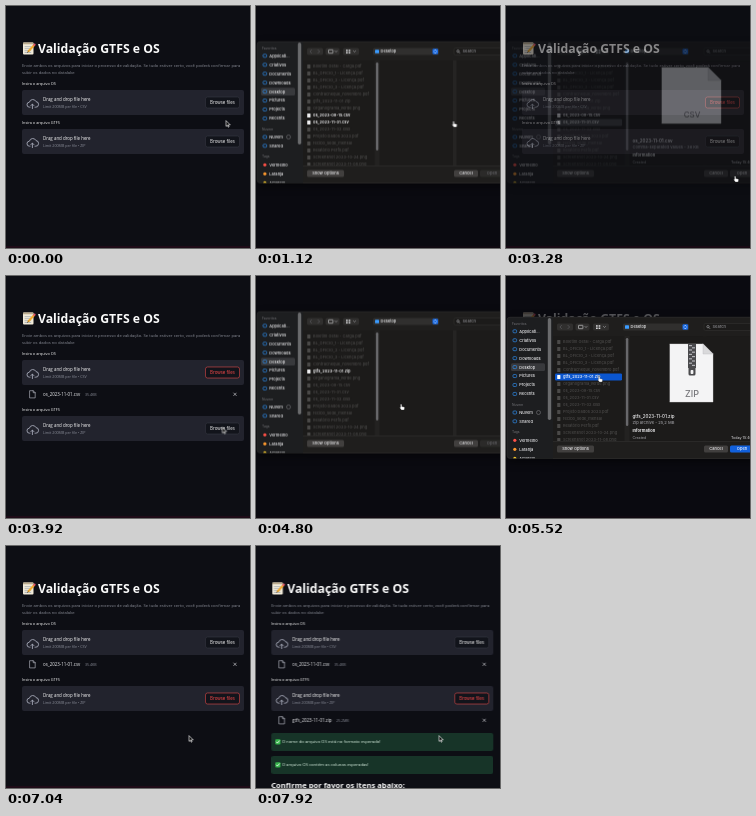
An HTML page for the animation above (8 s loop, 244 by 242 pixels).

```html
<!DOCTYPE html>
<html lang="pt">
<head>
<meta charset="utf-8">
<title>Validação GTFS e OS</title>
<style>
html, body { margin: 0; width: 100%; height: 100%; overflow: hidden; background: #0d0e14; }
svg { display: block; width: 100vw; height: 100vh; }
text { font-family: "Open Sans", "Noto Sans", sans-serif; white-space: pre; }
#dialog { filter: drop-shadow(0 3px 4px rgba(0, 0, 0, .5)); }
#dialog text { font-family: Inter, "Liberation Sans", sans-serif; font-weight: 500; }
</style>
</head>
<body>
<svg id="stage" viewBox="0 0 244 242" preserveAspectRatio="none"></svg>
<script>
const LOOP = 8000;

const rect = (x, y, w, h, fill, r = 0, more = '') =>
  `<rect x="${x}" y="${y}" width="${w}" height="${h}" rx="${r}" fill="${fill}" ${more}/>`;
const path = (d, stroke, width = 0.6, fill = 'none') =>
  `<path d="${d}" stroke="${stroke}" stroke-width="${width}" fill="${fill}" stroke-linejoin="round" stroke-linecap="round"/>`;
// y is the middle of the capitals
const text = (x, y, size, str, fill, more = '') =>
  `<text x="${x}" y="${y + size * 0.35}" font-size="${size}" fill="${fill}" ${more}>${str}</text>`;
const group = (id, body, hidden = false) =>
  `<g id="${id}"${hidden ? ' opacity="0"' : ''}>${body}</g>`;
const MID = 'text-anchor="middle"';
const BOLD = 'font-weight="700"';

// ---------- page ----------
const button = (stroke, color) =>
  rect(199.5, 7, 34, 11, '#12141b', 2, `stroke="${stroke}" stroke-width=".6"`) +
  text(216.5, 12.6, 4.45, 'Browse files', color, MID);

const cross = (x, y) => path(`M${x - 1.3} ${y - 1.3}l2.6 2.6m0 -2.6l-2.6 2.6`, '#e4e5ea', 0.6);

const fileRow = (name, size, sizeX) =>
  path('M24 30.7h3.2l2 2v5.2h-5.2zM27.2 30.7v2h2', '#c3c6d0', 0.6) +
  text(37, 34.3, 4.4, name, '#f2f3f6') +
  text(sizeX, 34.3, 3.6, size, '#8b8e99') +
  cross(229, 34.3);

function uploader(n, label, type, row) {
  return text(16, -6, 3.85, label, '#fafafa') +
    rect(16, 0, 222, 25, '#22232d', 2) +
    path('M24 17.2h-.4a2.5 2.5 0 0 1 -.2 -5a3.5 3.5 0 0 1 6.6 -.6a2.8 2.8 0 0 1 -.5 5.6h-.5M26.4 18.6v-4.4m-1.5 1.4l1.5 -1.5l1.5 1.5', '#a6aab8', 0.9) +
    text(37, 9, 4.42, 'Drag and drop file here', '#fafafa') +
    text(37, 17, 3.65, `Limit 200MB per file • ${type}`, '#8b8e99') +
    button('#343741', '#fafafa') +
    group('hot' + n, button('#d94343', '#ff4b4b'), true) +
    group('row' + n, row, true);
}

const memo =
  rect(17, 36.5, 10.5, 12, '#f1ead9', 1) +
  rect(17, 36.5, 10.5, 1.8, '#b9a98c', 0.6) +
  [40.5, 42.5, 44.5, 46.4].map(y => rect(18.6, y, 6.6, 0.6, '#8d9aa6')).join('') +
  path('M22.5 45.2L28.2 39', '#f0a92e', 2) +
  path('M28.1 39.1l.5 -.6', '#e0566d', 2) +
  path('M21.6 46.2l.5 -.5', '#4a3b30', 1);

const success = (y, str) =>
  rect(16, y, 222, 18, '#173428', 2) +
  rect(20, y + 6.3, 5.2, 5.2, '#35b44a', 1) +
  path(`M21.2 ${y + 9}l1 1.1l1.9 -2.4`, '#fff', 0.8) +
  text(26.7, y + 9, 4.25, str, '#dcf3e4');

const GRAY = '#878a94';
const page =
  memo +
  text(32, 42.7, 12.25, 'Validação GTFS e OS', '#fafafa', BOLD) +
  text(16, 59.7, 4.22, 'Envie ambos os arquivos para iniciar o processo de validação. Se tudo estiver certo, você poderá confirmar para', GRAY) +
  text(16, 67, 4.22, 'subir os dados no datalake', GRAY) +
  `<g transform="translate(0 84)">${uploader(1, 'Insira o arquivo OS', 'CSV', fileRow('os_2023-11-01.csv', '35.4KB', 79))}</g>` +
  group('second', uploader(2, 'Insira o arquivo GTFS', 'ZIP', fileRow('gtfs_2023-11-01.zip', '25.2MB', 81))) +
  group('ok1', success(187, 'O nome do arquivo OS está no formato esperado!'), true) +
  group('ok2', success(210, 'O arquivo OS contém as colunas esperadas!') +
    text(16, 239.6, 7.65, 'Confirme por favor os itens abaixo:', '#fafafa', BOLD), true);

// ---------- file dialog, top edge at y = 0 ----------
const BODY = '#1c1b1a', FIELD = '#302f2e', PUSH = '#413f3e', EDGE = '#353433';
const FILES = [
  'Boletim Geral - Carga.pdf', 'BL_OFICIO_1 - Licença.pdf', 'BL_OFICIO_2 - Licença.pdf',
  'BL_OFICIO_3 - Licença.pdf', 'Contracheque_novembro.pdf', 'gtfs_2023-11-01.zip',
  'Organograma_verde.png', 'os_2023-09-15.csv', 'os_2023-11-01.csv', 'os_2023-11-02.xlsx',
  'Projeto Dados 2023.pdf', 'recibo_sede_mensal', 'Relatório Perfil.pdf',
  'Screenshot 2023-10-24.png', 'Screenshot 2023-11-08.png'
];
const fileY = i => 25 + 7 * i;
const fileItem = (i, color) =>
  rect(51.2, fileY(i) - 2, 3.2, 4, color, 0.5) +
  text(57, fileY(i), 4, FILES[i], color);
const picked = (i, fill) =>
  rect(49, fileY(i) - 3.6, 67, 7.1, fill, 1.2) + fileItem(i, '#ffffff');

const side = (y, str, icon) => icon + text(13.3, y, 4, str, '#ececee');
const PLACES = ['Applicati…', 'Criativos', 'Documents', 'Downloads', 'Desktop', 'Pictures', 'Projects', 'Recents'];
const TAGS = [['Vermelho', '#ff5147'], ['Laranja', '#ff9a2e'], ['Amarelo', '#ffd02e']];
const blueIcon = y => rect(7, y - 1.5, 3.6, 3, 'none', 0.9, 'stroke="#2f8ff0" stroke-width=".7"');
const head = (y, str) => text(6, y, 3.3, str, '#68686c');

const sidebar =
  rect(0, 0, 47, 142, '#1d1e20') +
  rect(5, 46.3, 34, 7.6, '#38393c', 1.5) +
  head(7, 'Favoritos') +
  PLACES.map((p, i) => side(14.3 + 8.95 * i, p, blueIcon(14.3 + 8.95 * i))).join('') +
  head(87.5, 'Nuvem') +
  side(95.5, 'Nuvem', blueIcon(95.5)) +
  '<circle cx="32.5" cy="95.5" r="2" fill="none" stroke="#77777b" stroke-width=".6"/>' +
  side(104.3, 'Shared', blueIcon(104.3)) +
  head(115, 'Tags') +
  TAGS.map(([name, color], i) =>
    side(123.3 + 9 * i, name, `<circle cx="8.8" cy="${123.3 + 9 * i}" r="1.6" fill="${color}"/>`)).join('') +
  rect(41.8, 1, 3.4, 102, '#6a6b6d', 1.7);

const toolbar =
  rect(47, 0, 200, 19, '#1f1e1d') +
  rect(51, 6.5, 16, 7, FIELD, 1.5) +
  path('M55.5 8.4l-1.6 1.6l1.6 1.6M62 8.4l1.6 1.6l-1.6 1.6', '#66666a', 0.6) +
  rect(69.5, 6.5, 14, 7, FIELD, 1.5) + rect(72.5, 8.3, 4.4, 3.4, 'none', 0.4, 'stroke="#d8d8da" stroke-width=".6"') +
  rect(87, 6.5, 16, 7, FIELD, 1.5) +
  [90, 92.6].map(x => rect(x, 8.2, 1.7, 1.5, '#d8d8da') + rect(x, 10.5, 1.7, 1.5, '#d8d8da')).join('') +
  path('M79 9.5l1 1l1 -1M97.5 9.5l1 1l1 -1', '#b8b8ba', 0.6) +
  rect(117, 6.5, 66, 7, FIELD, 1.5) +
  rect(119, 8.2, 4, 3.6, '#3b9cff', 0.6) +
  text(124.5, 10, 4, 'Desktop', '#e8e8ea') +
  rect(176.5, 7.2, 5.6, 5.6, '#1667e0', 1.2) +
  path('M178.2 9.3l1.1 -1.1l1.1 1.1M178.2 10.8l1.1 1.1l1.1 -1.1', '#fff', 0.6) +
  rect(198, 6.5, 52, 7, BODY, 1.5, `stroke="${EDGE}" stroke-width=".5"`) +
  '<circle cx="202" cy="9.7" r="1.2" fill="none" stroke="#a5a5a8" stroke-width=".6"/>' +
  path('M203 10.7l.9 .9', '#a5a5a8') +
  text(206.5, 10, 4, 'Search', '#8c8c90');

const push = (x, w, str, fill, color) =>
  rect(x, 128.5, w, 7, fill, 1.5) + text(x + w / 2, 132, 4, str, color, MID);
const footer =
  rect(47, 124, 200, 18, '#1f1e1d') +
  rect(47, 124, 200, 0.5, EDGE) +
  push(51, 37, 'Show Options', PUSH, '#ececee') +
  push(198, 24, 'Cancel', PUSH, '#ececee') +
  push(224, 24, 'Open', '#2b2a29', '#66666a');

const sheet = (x, y, w, h, fold) =>
  path(`M${x} ${y}h${w - fold}l${fold} ${fold}v${h - fold}h${-w}z`, '#d4d4d6', 0.4, '#f4f4f5') +
  path(`M${x + w - fold} ${y}v${fold}h${fold}z`, '#b9b9bc', 0.4, '#d9d9db');
const preview = (art, name, kind) =>
  rect(124, 19.2, 122, 104.6, BODY) + art +
  text(126.5, 99, 4.5, name, '#f0f0f2') +
  text(126.5, 105.8, 4.1, kind, '#98989c') +
  text(126.5, 113.6, 4, 'Information', '#f0f0f2', 'style="font-weight:700"') +
  text(126.5, 120.6, 3.6, 'Created', '#8c8c90') +
  text(225, 120.6, 3.6, 'Today 15:40', '#c8c8cb');

const zipper = rect(182, 27, 8, 24, '#4a4a4d') +
  Array.from({ length: 10 }, (_, i) =>
    rect(i % 2 ? 186 : 183, 28 + 2.2 * i, 3, 1.2, '#b4b4b8')).join('') +
  rect(182.5, 49, 7, 9.5, '#4a4a4d', 1.5) + rect(184.6, 53, 2.8, 4, '#f4f4f5', 0.8);
const csvArt = sheet(156, 26, 59, 56, 13) + text(186, 73, 8, 'CSV', '#77777b', MID);
const zipArt = sheet(164, 27, 43, 58, 10) + zipper + text(186, 76.5, 9, 'ZIP', '#77777b', MID);

const dialog =
  '<clipPath id="frame"><rect x="1" y="0" width="260" height="141.5" rx="3"/></clipPath><g clip-path="url(#frame)">' +
  rect(0, 0, 260, 142, BODY) + sidebar + toolbar +
  FILES.map((_, i) => fileItem(i, '#4a4948')).join('') +
  group('csvs', fileItem(7, '#f0f0f2') + fileItem(8, '#f0f0f2')) +
  group('zips', fileItem(5, '#f0f0f2'), true) +
  rect(118.5, 19, 5, 105, '#232221') +
  rect(119.9, 21, 2.4, 88, '#68686b', 1.2) +
  rect(197, 19, 3.5, 105, '#252423') +
  footer +
  group('csvPick', preview(csvArt, 'os_2023-11-01.csv', 'Comma-separated values - 36 KB'), true) +
  group('zipPick', preview(zipArt, 'gtfs_2023-11-01.zip', 'Zip archive - 25,2 MB'), true) +
  group('csvGray', picked(8, '#47484b'), true) +
  group('csvBlue', picked(8, '#0b56cf'), true) +
  group('zipGray', picked(5, '#47484b'), true) +
  group('zipBlue', picked(5, '#0b56cf'), true) +
  group('openGray', push(224, 24, 'Open', PUSH, '#ececee'), true) +
  group('openBlue', push(224, 24, 'Open', '#1160dc', '#ffffff'), true) +
  '</g>' +
  rect(1, 0.2, 260, 141.2, 'none', 3, `stroke="${EDGE}" stroke-width=".5"`);

const arrow = path('M0 0v5.4l1.3 -1.2l.9 2l.9 -.4l-.9 -1.9h1.7z', '#fff', 0.6, '#111');
const hand = path('M1 0q.8 0 .8 .8v1.7l2.2 .5q.7 .2 .6 1l-.5 2h-2.7l-1.7 -2.3q.1 -.8 .8 -.3v-2.6q0 -.8 .5 -.8z', '#222', 0.3, '#fff');

const $ = id => document.getElementById(id);
$('stage').innerHTML =
  rect(0, 0, 244, 242, '#0d0e14') +
  group('line', rect(0, 240, 244, 2, '#1e0b17')) +
  group('page', page) +
  group('dim', rect(0, 0, 244, 242, '#090a0f'), true) +
  group('dialog', dialog, true) +
  group('cursor', group('arrow', arrow) + group('hand', hand, true));

// ---------- motion ----------
function play(id, prop, steps, easing = 'linear') {
  const frames = steps.map(([t, v]) => ({ offset: t / LOOP, [prop]: v, easing }));
  if (steps[0][0] > 0) frames.unshift({ ...frames[0], offset: 0 });
  const last = frames[frames.length - 1];
  if (last.offset < 1) frames.push({ ...last, offset: 1 });
  $(id).animate(frames, { duration: LOOP, iterations: Infinity });
}
const HARD = 'steps(1, end)';
const show = (id, from, to = LOOP) =>
  play(id, 'opacity', [[0, from ? 0 : 1], [from, 1], ...(to < LOOP ? [[to, 0]] : [])], HARD);
const move = (id, steps, easing) =>
  play(id, 'transform', steps.map(([t, x, y]) => [t, `translate(${x}px, ${y}px)`]), easing);

const fade = (full, half) => [
  [0, 0], [560, 0], [760, full], [3160, full], [3280, half], [3440, 0],
  [4360, 0], [4560, full], [6640, full], [6760, half], [6920, 0]
];
play('dialog', 'opacity', fade(1, 0.36));
play('dim', 'opacity', fade(0.68, 0.25));

const LOW = 41, HIGH = 35.5;
move('dialog', [
  [0, 0, HIGH], [1200, 0, HIGH], [1360, 0, LOW], [3100, 0, LOW], [3200, 0, HIGH],
  [4880, 0, HIGH], [5040, 0, LOW], [6640, 0, LOW], [6760, 0, HIGH]
]);

show('hot1', 320, 4080);
show('hot2', 4080);
show('row1', 3600);
show('row2', 7520);
show('ok1', 7680);
show('ok2', 7760);
show('line', 0, 7760);
show('csvs', 0, 3900);
show('zips', 3900);

// A choice is blue until the dialog closes, then gray while it fades
const CSV = 2240, CSV_SENT = 3160, ZIP = 5520, ZIP_SENT = 6640, RESET = 3900;
show('csvPick', CSV, RESET);
show('csvBlue', CSV, CSV_SENT);
show('csvGray', CSV_SENT, RESET);
show('zipPick', ZIP);
show('zipBlue', ZIP, ZIP_SENT);
show('zipGray', ZIP_SENT);
play('openBlue', 'opacity', [[0, 0], [CSV, 1], [CSV_SENT, 0], [ZIP, 1], [ZIP_SENT, 0]], HARD);
play('openGray', 'opacity', [[0, 0], [CSV_SENT, 1], [RESET, 0], [ZIP_SENT, 1]], HARD);

move('second', [[0, 0, 123], [3600, 0, 140]], HARD);
move('page', [[0, 0, 0], [7760, -0.7, 0]], HARD);

move('cursor', [
  [0, 220, 115], [80, 220, 115], [240, 217, 101], [400, 215, 96], [800, 215, 96],
  [1440, 178, 134], [1840, 110, 124], [2080, 88, 120], [2320, 88, 120],
  [2960, 228, 170], [3360, 228, 170], [4000, 216, 151], [4400, 216, 151],
  [4800, 144, 128], [5360, 92, 100], [5600, 92, 100], [6240, 229, 172],
  [6720, 229, 172], [7040, 183, 190]
], 'ease-in-out');
const pointing = [[0, 0], [320, 1], [3440, 0], [4000, 1], [6880, 0]];
play('hand', 'opacity', pointing, HARD);
play('arrow', 'opacity', pointing.map(([t, v]) => [t, 1 - v]), HARD);
</script>
</body>
</html>
```
